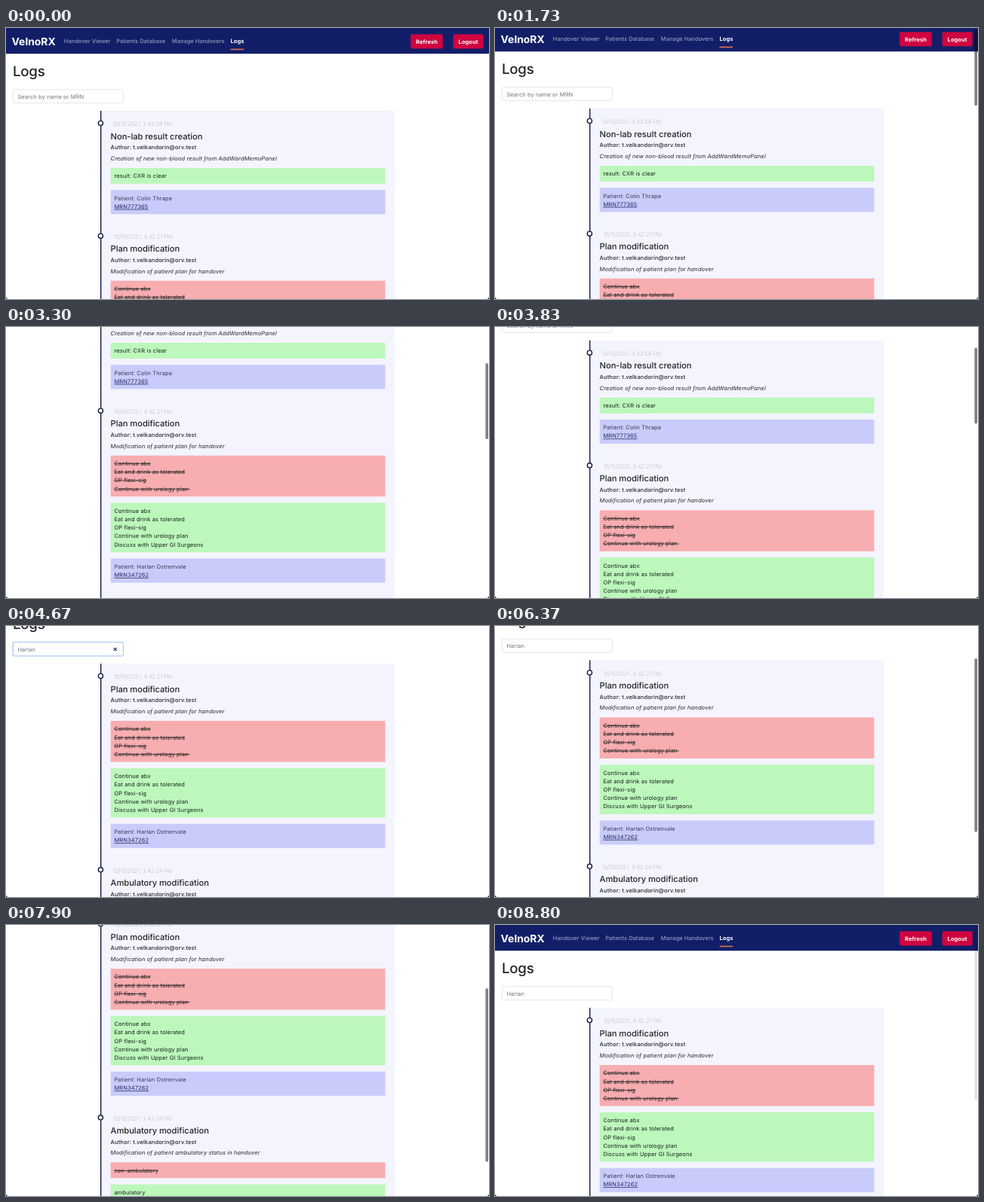
An HTML page that plays this animation: 640x360 px, repeating every 8.9 s.

```html
<!DOCTYPE html>
<html lang="en">
<head>
<meta charset="utf-8">
<title>Logs</title>
<style>
  html, body { margin: 0; width: 100%; height: 100%; overflow: hidden; background: #fff; }
  svg { display: block; width: 640px; height: 360px; }
  text {
    font: 400 7.47px Inter, "Open Sans", sans-serif; letter-spacing: .14px;
    fill: #212529; white-space: pre; text-rendering: geometricPrecision;
  }
  .brand { font-size: 13.9px; font-weight: 700; letter-spacing: 0; fill: #fff; }
  .nav { font-weight: 500; letter-spacing: .02px; fill: #9298bd; }
  .on { font-weight: 700; fill: #fff; }
  .btn { font-weight: 700; letter-spacing: .08px; fill: #fff; text-anchor: middle; }
  .h1 { font-size: 18.7px; font-weight: 450; letter-spacing: -.25px; }
  .field { letter-spacing: .1px; fill: #6c757d; }
  .time { font-weight: 100; letter-spacing: 0; fill: #666; text-anchor: end; }
  .h4 { font-size: 11.2px; font-weight: 450; letter-spacing: -.06px; }
  .author { font-weight: 500; }
  .note { font-style: italic; }
  .old { text-decoration: line-through; fill: #222; }
  .new { fill: #14201a; }
  .who { fill: #363a55; }
  .link { fill: #20285f; text-decoration: underline; }
</style>
</head>
<body>
<svg id="stage" viewBox="0 0 640 360"></svg>
<script>
const LOOP = 8900, NAVY = '#121f68', INK = '#141b48', LINE = 11.2, WORD = 'Harlan';
const stage = document.getElementById('stage');

function add(parent, tag, attrs, content) {
  const el = document.createElementNS('http://www.w3.org/2000/svg', tag);
  for (const k in attrs) el.setAttribute(k, attrs[k]);
  if (content !== undefined) el.textContent = content;
  parent.appendChild(el);
  return el;
}
const rect = (p, x, y, width, height, fill, more) => add(p, 'rect', { x, y, width, height, fill, ...more });
const label = (p, x, y, cls, str) => add(p, 'text', { x, y, class: cls }, str);
const show = (el, on) => el.setAttribute('visibility', on ? 'visible' : 'hidden');

const FILL = { old: '#f8adb0', new: '#bcf7bb', who: '#c9ccfb' };
const harlan = ['Patient: Harlan Ostrenvale', 'MRN347262'];
const plan = ['Continue abx', 'Eat and drink as tolerated', 'OP flexi-sig', 'Continue with urology plan'];

const result = {
  time: '10/15/2021, 3:42:58 PM', title: 'Non-lab result creation',
  note: 'Creation of new non-blood result from AddWardMemoPanel',
  boxes: [['new', ['result: CXR is clear']], ['who', ['Patient: Colin Thrape', 'MRN777365']]]
};
const planning = {
  time: '10/15/2021, 3:42:21 PM', title: 'Plan modification',
  note: 'Modification of patient plan for handover',
  boxes: [['old', [...plan.slice(0, 3), plan[3] + ' ']],
          ['new', [...plan, 'Discuss with Upper GI Surgeons']], ['who', harlan]]
};
const walking = {
  time: '10/15/2021, 3:42:04 PM', title: 'Ambulatory modification',
  note: 'Modification of patient ambulatory status in handover',
  boxes: [['old', ['non-ambulatory']], ['new', ['ambulatory']], ['who', harlan]]
};

// Draws one log entry with its dot at y; returns the dot position of the next one.
function entry(p, y, e) {
  add(p, 'circle', { cx: 125.4, cy: y, r: 3.1, fill: '#fff', stroke: INK, 'stroke-width': 1.4 });
  label(p, 220.7, y + 3.7, 'time', e.time);
  label(p, 138.6, y + 21.1, 'h4', e.title);
  label(p, 138.6, y + 34.8, 'author', 'Author: t.velkandorin@orv.test');
  label(p, 138.6, y + 49.4, 'note', e.note);
  let top = y + 59.5;
  for (const [kind, lines] of e.boxes) {
    const h = lines.length * LINE + 9.7;
    rect(p, 138.7, top, 363.8, h, FILL[kind]);
    lines.forEach((s, i) =>
      label(p, 143.4, top + 13.3 + i * LINE, kind === 'who' && i ? 'link' : kind, s));
    top += h + 8.3;
  }
  return top + 20.6;
}

function timeline(p, height, list) {
  const g = add(p, 'g', {});
  rect(g, 125, 110, 390, height, '#f4f4fe');
  rect(g, 125, 110, 1.4, height, INK);
  list.reduce((y, e) => entry(g, y, e), 126.5);
  return g;
}

// Page
const page = add(stage, 'g', {});
rect(page, 0, 0, 640, 34.2, NAVY);
label(page, 7.6, 22.7, 'brand', 'VelnoRX');
[[76.8, 'Handover Viewer'], [146.2, 'Patients Database'], [219.8, 'Manage Handovers']]
  .forEach(([x, s]) => label(page, x, 20.3, 'nav', s));
label(page, 297.6, 20.3, 'nav on', 'Logs');
rect(page, 297.6, 27.6, 17.4, 1.6, '#e0744e');
[[536.5, 42, 'Refresh'], [593, 39.2, 'Logout']].forEach(([x, w, s]) => {
  rect(page, x, 8.8, w, 18.3, '#cf0540', { rx: 2, stroke: '#cf0540', 'stroke-opacity': .55, 'stroke-width': 1.5 });
  label(page, x + w / 2, 20.5, 'btn', s);
});
label(page, 9, 63.7, 'h1', 'Logs');

const ring = rect(page, 8.3, 80.8, 147.9, 19.8, '#c3dcfb', { rx: 2.8 });
const field = rect(page, 9.4, 81.8, 145.9, 17.9, '#fff', { rx: 1.9, 'stroke-width': .6 });
const query = label(page, 15.4, 93.6, 'field', '');
const caret = rect(page, 0, 86.3, .7, 8.6, '#333');
const clear = add(page, 'path', { d: 'M142.7 88.8l4 4m0-4l-4 4', stroke: NAVY, 'stroke-width': 1.1 });
const all = timeline(page, 1150, [result, planning, walking]);
const found = timeline(page, 435, [planning, walking]);

const thumb = rect(stage, 635.4, 0, 3.6, 0, '#000', { rx: 1.8 });
add(stage, 'path', { d: 'M0 356.5Q0 360 3.5 360H0ZM640 356.5Q640 360 636.5 360H640Z', fill: '#000' });

// Motion
const linear = u => u;
const out = u => 1 - (1 - u) ** 2.4;
const inOut = u => u * u * (3 - 2 * u);
// start, end, scroll reached, easing; equal times make a jump
const MOVES = [
  [1700, 1970, 26, linear], [2230, 2230, 62], [2430, 2430, 90.5],
  [2495, 3030, 161.5, out], [3200, 3200, 163.5], [3300, 3300, 165], [3430, 3430, 165.6],
  [3540, 4000, 60, inOut],
  [6300, 6300, 62], [6370, 6370, 64.5], [6495, 7130, 195.5, out], [7200, 7200, 196],
  [7370, 7900, 128, inOut], [8370, 8720, 0, out]
];
const KEYS = [4300, 4370, 4430, 4500, 4570, 4630];
const FOCUS = 4070, BLUR = 5970;

function scrollAt(t) {
  let s = 0;
  for (const [a, b, to, ease] of MOVES) {
    if (t < a) break;
    s = t >= b ? to : s + (to - s) * ease((t - a) / (b - a));
  }
  return s;
}

function thumbAlpha(t) {
  if (t < 1725 || (t >= 4070 && t < 6295)) return 0;
  if (t < 4070) return Math.min(1, (4070 - t) / 130);
  return t < 8700 ? 1 : Math.max(.24, 1 - (t - 8700) / 130);
}

function draw(t) {
  const s = scrollAt(t), filtered = t >= KEYS[1];
  const focus = t >= FOCUS && t < BLUR;
  const typed = WORD.slice(0, KEYS.filter(k => t >= k).length);

  page.setAttribute('transform', `translate(0 ${-s})`);
  show(all, !filtered);
  show(found, filtered);

  const str = typed || 'Search by name or MRN';
  if (query.textContent !== str) query.textContent = str;
  show(ring, focus);
  field.setAttribute('stroke', focus ? '#86b8f5' : '#ced4da');
  show(clear, focus && typed);
  show(caret, focus && (t < 4670 || (t >= 4970 && t < 5300) || t >= 5670));
  caret.setAttribute('x', 15.4 + (typed ? query.getComputedTextLength() : 0));

  const [y0, rate, len] = filtered ? [1.3, .647, 230.7] : [1.5, .282, 101];
  thumb.setAttribute('y', y0 + rate * s);
  thumb.setAttribute('height', len);
  thumb.setAttribute('opacity', .5 * thumbAlpha(t));
}

const start = performance.now();
function tick() {
  draw((performance.now() - start) % LOOP);
  requestAnimationFrame(tick);
}
tick();
</script>
</body>
</html>
```
